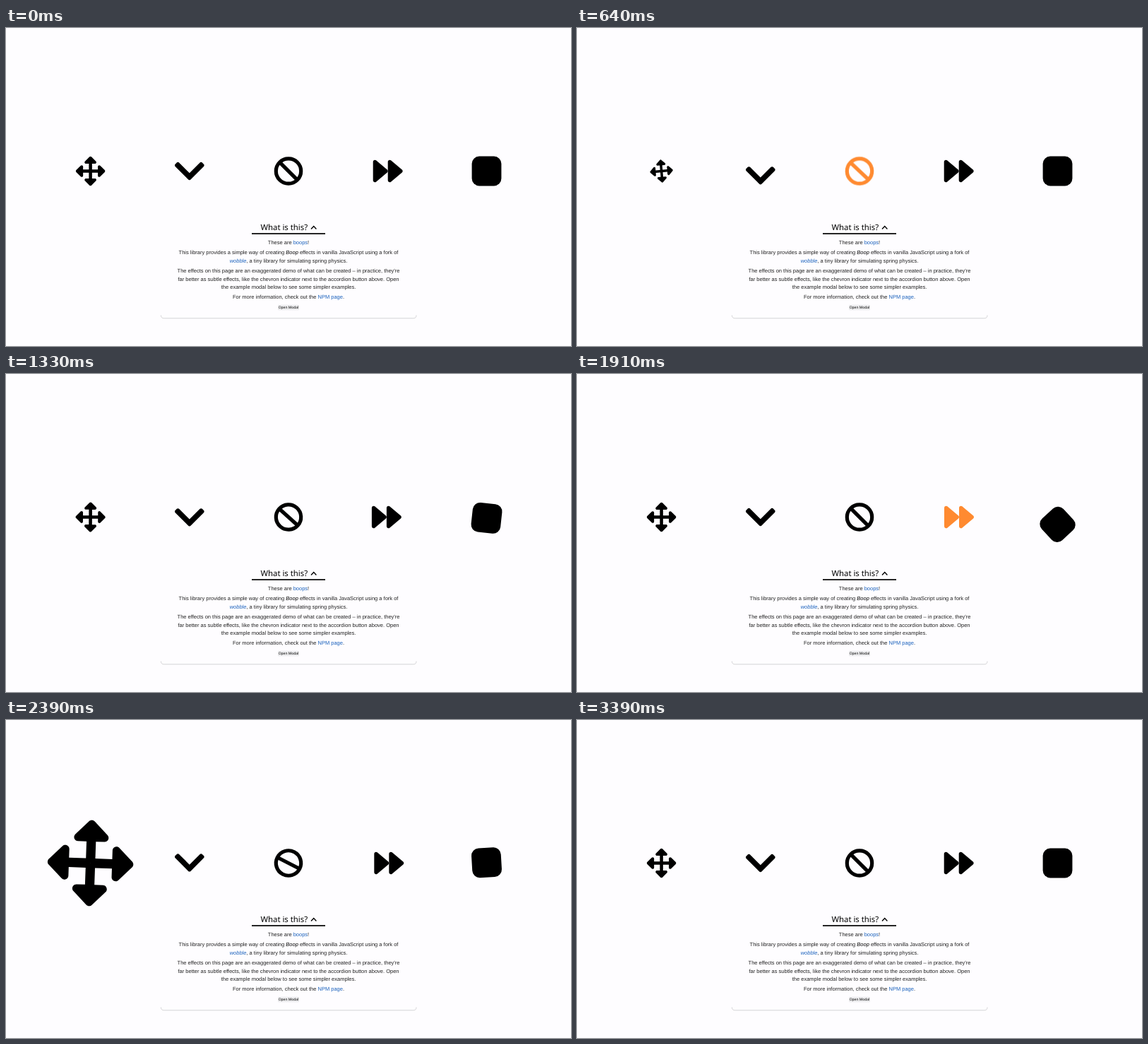
An HTML page for the animation above (3420 ms loop, 800x450 px).

```html
<!DOCTYPE html>
<html lang="en">
<head>
<meta charset="utf-8">
<title>Boops</title>
<style>
  html, body { margin: 0; width: 100%; height: 100%; overflow: hidden; background: #fefdff; }
  svg { display: block; width: 800px; height: 450px; }
  text { text-anchor: middle; text-rendering: geometricPrecision; }
  .copy text { font: 7.5px "Liberation Sans", Arial, sans-serif; fill: #222; }
  .copy .link { fill: #1b62bd; }
  .copy .em { font-style: italic; }
  .copy .strong { fill: #000; }
  .ui { font-family: "Noto Sans", "Open Sans", sans-serif; }
</style>
</head>
<body>
<svg viewBox="0 0 800 450">
  <defs>
    <path id="arm" d="M-28 0V-129H-79c-21.4 0-32.1-25.9-17-41l79-79c9.4-9.4 24.6-9.4 34 0l79 79c15.1 15.1 4.4 41-17 41H28V0z"/>
    <path id="play" d="M244.5 231.4l-192-160C31.9 54.3 0 68.6 0 96v320c0 27.4 31.9 41.8 52.5 24.6l192-160c15.3-12.8 15.3-36.4 0-49.2z"/>
  </defs>

  <g class="icon"><g transform="scale(.081)">
    <use href="#arm"/>
    <use href="#arm" transform="rotate(90)"/>
    <use href="#arm" transform="rotate(180)"/>
    <use href="#arm" transform="rotate(270)"/>
  </g></g>

  <g class="icon">
    <path transform="scale(.0955) translate(-224 -256)" d="M207 381.5L12.7 187.1c-9.4-9.4-9.4-24.6 0-33.9l22.7-22.7c9.4-9.4 24.5-9.4 33.9 0L224 284.5l154.7-154c9.4-9.4 24.5-9.4 33.9 0l22.7 22.7c9.4 9.4 9.4 24.6 0 33.9L241 381.5c-9.4 9.4-24.6 9.4-34 0z"/>
  </g>

  <g class="icon">
    <path d="M-12.4-12.4L12.4 12.4M17.7 0A17.7 17.7 0 1 1-17.7 0A17.7 17.7 0 1 1 17.7 0z" fill="none" stroke="currentColor" stroke-width="5.2"/>
  </g>

  <g class="icon"><g transform="scale(.082) translate(-256 -256)">
    <use href="#play"/>
    <use href="#play" x="256"/>
  </g></g>

  <g class="icon">
    <rect x="-20.9" y="-20.9" width="41.8" height="41.8" rx="10.5"/>
  </g>

  <text class="ui" x="393.8" y="286" font-size="11.35">What is this?</text>
  <path d="M432 284.4L435.7 280.5L439.4 284.4" fill="none" stroke="#000" stroke-width="1.4"/>
  <rect x="348" y="290.2" width="104" height="1.7"/>

  <g class="copy">
    <text x="400" y="306">These are <tspan class="link">boops</tspan>!</text>
    <text x="400" y="320.4">This library provides a simple way of creating <tspan class="em strong">Boop</tspan> effects in vanilla JavaScript using a fork of</text>
    <text x="400" y="331.7"><tspan class="link em">wobble</tspan>, a tiny library for simulating spring physics.</text>
    <text x="400" y="346.2">The effects on this page are an exaggerated demo of what can be created – in practice, they're</text>
    <text x="400" y="357.5">far better as subtle effects, like the chevron indicator next to the accordion button above. Open</text>
    <text x="400" y="368.7">the example modal below to see some simpler examples.</text>
    <text x="400" y="382.9">For more information, check out the <tspan class="link">NPM page</tspan>.</text>
  </g>

  <rect x="385" y="391.8" width="30" height="7.4" rx="1" fill="#ececee"/>
  <text class="ui" x="400" y="397.3" font-size="4.95">Open Modal</text>
  <path d="M219.4 406.5Q219.4 410.8 223.7 410.8H576.7Q581 410.8 581 406.5" fill="none" stroke="#cfced1" stroke-width=".9"/>
</svg>

<script>
  const LOOP = 3420;
  const icons = [...document.querySelectorAll('.icon')];

  // Alternating extremes of a decaying oscillation
  const ring = (start, value, half, decay) =>
    Array.from({ length: 9 }, (_, i) => [start + i * half, i < 8 ? value / (-decay) ** i : 0]);

  // Joins [time, value] marks with half cosine waves
  function swing(t, marks) {
    for (let i = 1; i < marks.length; i++) {
      const [t0, a] = marks[i - 1], [t1, b] = marks[i];
      if (t >= t0 && t < t1) return a + (b - a) * (1 - Math.cos(Math.PI * (t - t0) / (t1 - t0))) / 2;
    }
    return 0;
  }

  const boop = start => [[start, 0], ...ring(start + 130, 1, 147, 2.25)];
  const kick = (start, peak, trough) =>
    [[start, 0], [start + 105, peak], ...ring(start + 210, trough, 110, 2.2)];

  // hover: [from, to] spans of the pointer; pose: transform for spring value v
  const parts = [
    { x: 119.6, hover: [[365, 525], [2180, 2330]], waves: [kick(365, 2, -4.57), kick(2180, 1.8, -3.93)],
      pose: v => `rotate(${v * 22.4}) scale(${1 + v})` },
    { x: 259.8, hover: [[570, 625], [2030, 2090]], waves: [boop(570), boop(2030)],
      pose: v => `translate(0 ${v * 11})` },
    { x: 400, hover: [[630, 690], [1965, 2015]], waves: [boop(630), boop(1965)],
      pose: v => `rotate(${v * -90})` },
    { x: 540.7, hover: [[745, 800], [1900, 1950]], waves: [boop(745), boop(1900)],
      pose: v => `translate(${v * 21.5} 0)` },
    { x: 680.5, hover: [[860, 930], [1785, 1850]], waves: [boop(860), boop(1785)],
      pose: v => `translate(0 ${v * 10.3}) rotate(${v * 47})` }
  ];

  function draw(t) {
    parts.forEach((part, i) => {
      const v = part.waves.reduce((sum, marks) => sum + swing(t, marks), 0);
      const span = part.hover.find(([from, to]) => t >= from && t < to);
      const shade = span ? Math.min(1, (t - span[0]) / 110) * 0.65 : 0;
      const icon = icons[i];
      icon.setAttribute('transform', `translate(${part.x} 202.5) ${part.pose(v)}`);
      icon.style.fill = icon.style.color = span ? '#ff8a30' : '#000';
      icon.style.filter = span ? `drop-shadow(0 .3px .5px rgba(0,0,0,${shade}))` : 'none';
    });
  }

  const began = performance.now();
  function tick() {
    draw((performance.now() - began) % LOOP);
    requestAnimationFrame(tick);
  }
  tick();
</script>
</body>
</html>
```
